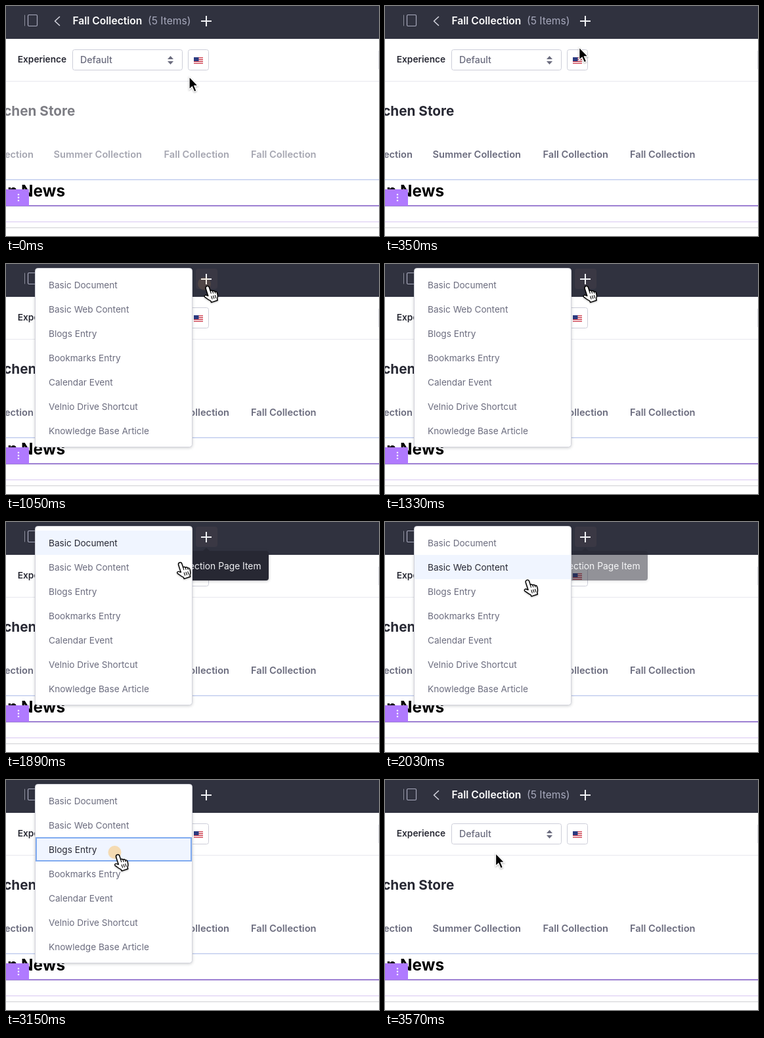
Animation of 568x350 px, one loop 3.85 s. Source, as an HTML page:

```html
<!DOCTYPE html>
<html lang="en">
<head>
<meta charset="utf-8">
<title>Collection menu</title>
<style>
  html, body { margin: 0; width: 100%; height: 100%; overflow: hidden; background: #fff; }
  svg { display: block; width: 568px; height: 350px; }
  text { font-family: Inter, Roboto, "Liberation Sans", sans-serif; fill: #6b6c7e; }
  .bold { font-weight: 600; }
  .dark, .row.active text { fill: #272833; }
  .nav { font-size: 14.65px; font-weight: 600; }
  .box { fill: #fff; stroke: #cdced9; }
  .line { fill: none; stroke-linecap: round; stroke-linejoin: round; }
  .row rect { fill: none; }
  .row.active rect { fill: #f0f5ff; }
  .row text { font-size: 13.62px; }
  .tip text { font-size: 13.8px; fill: #f1f2f5; }
  #menu { filter: drop-shadow(0 1px 2px rgba(39, 40, 51, .24)); }
  .tip { filter: drop-shadow(0 1px 2px rgba(39, 40, 51, .3)); }
  .cursor { filter: drop-shadow(0 1px 1px rgba(0, 0, 0, .3)); }
</style>
</head>
<body>
<svg viewBox="0 0 568 350">
  <rect width="568" height="350" fill="#fff"/>

  <!-- header -->
  <rect width="568" height="50" fill="#30323f"/>
  <path class="line" d="M28.5 14V30" stroke="#8d8e9c"/>
  <rect x="33.5" y="13.5" width="14" height="17" rx="1.5" fill="none" stroke="#a7a9bc" stroke-width="1.2"/>
  <path class="line" d="M81.5 16.5L74.5 23L81.5 29.5" stroke="#d3d4de" stroke-width="1.6"/>
  <text class="bold" x="101.4" y="28" font-size="15.6" style="fill:#fff">Fall Collection</text>
  <text x="216" y="28" font-size="15.6" style="fill:#a7a9bc">(5 Items)</text>
  <rect id="hover" x="289" y="7" width="33" height="31" rx="4" fill="#3a3844"/>
  <path d="M305 15V31M297 23H313" stroke="#f1f2f5" stroke-width="2"/>

  <!-- toolbar -->
  <text class="bold dark" x="17.8" y="86" font-size="13.7">Experience</text>
  <rect class="box" x="101.5" y="66.5" width="167" height="31" rx="3"/>
  <text x="113" y="87" font-size="14.2" font-weight="500">Default</text>
  <path d="M246 81L250.5 76L255 81ZM246 84L250.5 89L255 84Z" fill="#6b6c7e"/>
  <rect class="box" x="277.5" y="66.5" width="31" height="31" rx="3"/>
  <rect x="286" y="78" width="14" height="10" fill="#efc9ce"/>
  <path d="M286 78.5H300M286 81.500H300M286 84.500H300M286 87.500H300" stroke="#d0404f" stroke-width="1.2"/>
  <rect x="286" y="78" width="7.5" height="6" fill="#2b3a80"/>
  <path d="M567.5 68V96" stroke="#e0e0e6"/>
  <path d="M0 114.5H568" stroke="#e7e7ed"/>

  <!-- page -->
  <g id="page">
    <text class="dark" x="105.2" y="167" font-size="20.7" font-weight="700" text-anchor="end">Kitchen Store</text>
    <text class="nav" x="42" y="231" text-anchor="end">Spring Collection</text>
    <text class="nav" x="72.6" y="231">Summer Collection</text>
    <text class="nav" x="240.5" y="231">Fall Collection</text>
    <text class="nav" x="373" y="231">Fall Collection</text>
  </g>
  <path d="M0 264.3H568" stroke="#b9c6ec" stroke-width="1.2"/>
  <text x="90" y="289.5" font-size="24.3" font-weight="700" text-anchor="end" style="fill:#000">Kitchen News</text>
  <path d="M0 304H568" stroke="#9d80d2" stroke-width="2"/>
  <path d="M0 328.5H568" stroke="#d8c6f2"/>
  <path d="M0 337.5H568" stroke="#cfcfd2"/>
  <rect y="279" width="35" height="25" fill="#b07aff"/>
  <path class="line" d="M19 287V287M19 291.5V291.5M19 296V296" stroke="#fff" stroke-width="2.6"/>

  <g class="tip" id="tip">
    <path d="M299 45L305 39L311 45Z" fill="#272833"/>
    <rect x="210" y="44" width="190" height="45" rx="4" fill="#272833"/>
    <text x="388.5" y="72" text-anchor="end">Add Collection Page Item</text>
  </g>

  <g id="menu">
    <rect x="44.5" y="6.5" width="239" height="272" rx="4" fill="#fff" stroke="#d3d4dc"/>
    <g id="rows"></g>
    <rect id="focus" x="46" y="88" width="236" height="35" fill="none" stroke="#80abf0" stroke-width="2"/>
  </g>

  <circle id="ripple" r="10" fill="#fbbd55"/>
  <g id="pointer">
    <path class="cursor" id="arrow" d="M1 1.5V21L5.4 16.9L8.7 24.5L12 23L8.8 15.5H14.5Z"
      fill="#000" stroke="#fff" stroke-width="1.3"/>
    <g class="cursor" id="hand" transform="translate(-3.2 2.4) scale(1.04)" stroke="#000" stroke-width="1.4" stroke-linejoin="round">
      <path fill="#fff" d="M4.8 1.3C6.3 .7 7.7 1.4 8.2 2.9L10 8.4C10.7 7.3 12.6 7.2 13.3 8.7
        C14.2 7.7 16 7.9 16.6 9.4C17.8 8.7 19.3 9.4 19.8 11C21 14.5 21.1 17 19.9 19.6L20.6 22
        L11.5 25L10.5 22.8C7.5 21.8 5 19.3 2.2 17.6C.6 16.3 1.3 14.2 3.4 14.4L6.8 15.6L3.3 5
        C2.8 3.3 3.3 1.9 4.8 1.3Z"/>
      <path class="line" stroke-width="1.1" d="M10 8.4L11 11.8M13.3 8.7L14.2 11.5M16.6 9.4L17.3 11.5
        M11.5 16L12.7 20M14.2 15.3L15.4 19.2M16.9 14.6L18 18.3"/>
    </g>
  </g>
</svg>

<script>
const LOOP = 3850, STEP = 70;
const items = ["Basic Document", "Basic Web Content", "Blogs Entry", "Bookmarks Entry",
  "Calendar Event", "Velnio Drive Shortcut", "Knowledge Base Article"];

// time, x, y of the pointer
const path = [
  [0, 278, 106], [210, 286, 88], [420, 299, 48], [560, 304, 30],
  [1610, 304, 30], [1890, 262.5, 58], [2100, 190, 98], [2240, 168.5, 109], [2310, 167.5, 110],
  [LOOP, 167.5, 110]
];
// start time and highlighted row
const picks = [[1820, 0], [1960, 1], [2100, 2]];
const clicks = [840, 3150];
const OPEN = 980, CLOSE = 3360;

const $ = id => document.getElementById(id);
$("rows").innerHTML = items.map((name, i) =>
  `<g class="row"><rect x="45" y="${13 + 37 * i}" width="238" height="37"/>` +
  `<text x="65" y="${37 + 37 * i}">${name}</text></g>`).join("");
const rows = [...$("rows").children];

const ramp = (t, a, b) => Math.min(1, Math.max(0, (t - a) / (b - a)));
const within = (t, a, b) => t >= a && t < b;
const show = (id, on) => $(id).style.display = on ? "" : "none";
const fade = (id, value) => $(id).style.opacity = value;
const place = (id, x, y) => $(id).setAttribute("transform", `translate(${x} ${y})`);

function pointAt(t) {
  const i = path.findIndex(k => k[0] > t);
  const a = path[i - 1], b = path[i], u = ramp(t, a[0], b[0]);
  return [a[1] + (b[1] - a[1]) * u, a[2] + (b[2] - a[2]) * u];
}

function draw(t) {
  const [x, y] = pointAt(t);
  place("pointer", x, y);
  const hand = within(t, 560, CLOSE);
  show("hand", hand);
  show("arrow", !hand);

  fade("page", 0.6 + 0.4 * ramp(t, 0, 280));
  fade("hover", t < 3150 ? ramp(t, 560, 910) : 0);
  fade("tip", t < 1540 ? 0 : 1 - ramp(t, 1960, 2100));

  show("menu", within(t, OPEN, CLOSE));
  show("focus", t >= 3150);
  const pick = picks.filter(p => p[0] <= t).pop();
  rows.forEach((row, i) => row.classList.toggle("active", !!pick && pick[1] === i));

  const click = clicks.find(c => within(t, c, c + 280));
  fade("ripple", click === undefined ? 0 : 0.45 * (1 - ramp(t, click, click + 280)));
  place("ripple", x - 2, y);
}

const start = performance.now();
function tick() {
  const t = (performance.now() - start) % LOOP;
  draw(Math.floor(t / STEP) * STEP);
  requestAnimationFrame(tick);
}
tick();
</script>
</body>
</html>
```
